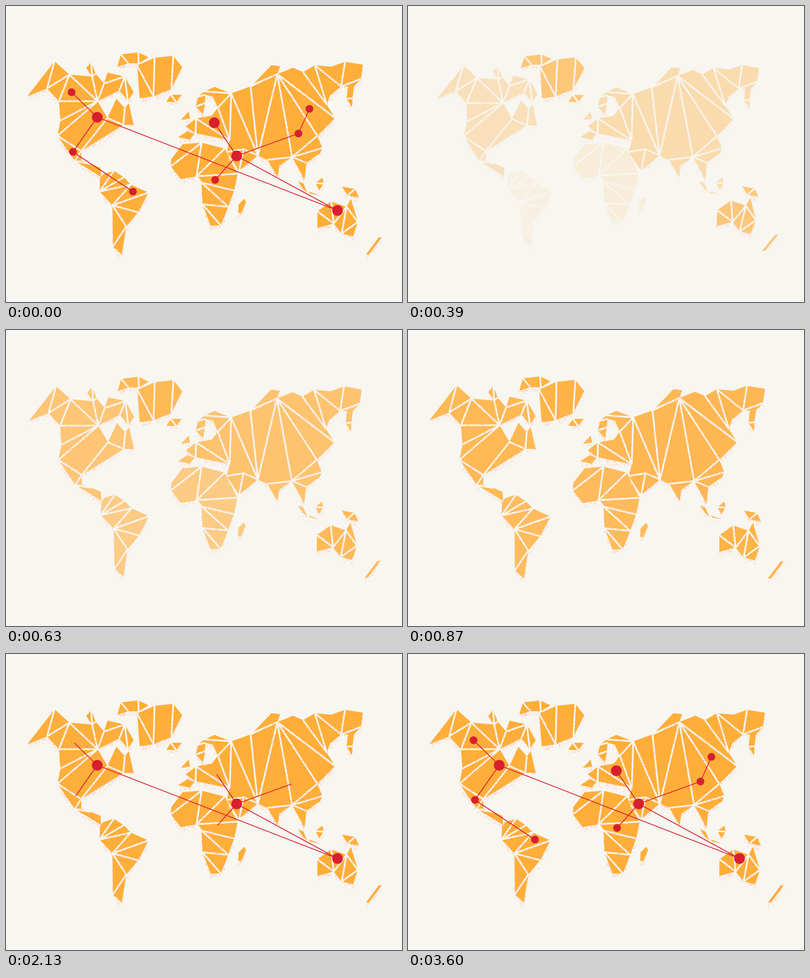
An HTML page with a canvas that plays this animation: 800x600 px, repeating every 3660 ms.

```html
<!DOCTYPE html>
<html lang="en">
<head>
<meta charset="utf-8">
<title>Connected world</title>
<style>
html, body { margin: 0; width: 100%; height: 100%; overflow: hidden; background: #f7f6f1; }
canvas { position: absolute; left: 0; top: 0; width: 800px; height: 600px; transform-origin: 50% 50%; }
</style>
</head>
<body>
<script>
const W = 800, H = 600, LOOP = 3660;
const LAND = '#ffae3a', RED = '#d71f2f';
const LETTERS = 'abcdefghijklmnopqrstuvwxyzABCDEFGHIJKLMNOPQRSTUVWXYZ';

let seed = 7;
const rand = () => (seed = seed * 16807 % 2147483647) / 2147483647;
const clamp = v => Math.max(0, Math.min(1, v));
const outCubic = u => 1 - (1 - u) ** 3;
const inOutQuad = u => u < .5 ? 2 * u * u : 1 - 2 * (1 - u) ** 2;

function addLayer() {
  const canvas = document.createElement('canvas');
  canvas.width = W;
  canvas.height = H;
  document.body.append(canvas);
  return canvas;
}

// Corners are lettered in order; each seam names the two corners it joins.
// Inner corners serve seams only.
function island(outline, seams = '', inner = '') {
  const parse = s => s ? s.split(',').map(p => p.split(' ')) : [];
  const edge = parse(outline), all = edge.concat(parse(inner));
  const at = c => all[LETTERS.indexOf(c)].join(' ');
  return {
    shape: new Path2D('M' + edge.join('L') + 'Z'),
    cuts: new Path2D(seams.split(' ').filter(Boolean).map(([a, b]) => `M${at(a)}L${at(b)}`).join(''))
  };
}

// Speckled shadow below every edge: a pixel is lit if a random look upwards finds land
function speckle(g) {
  const { data } = g.getImageData(0, 0, W, H);
  const solid = (x, y) => data[(y * W + x) * 4 + 3] > 128;
  g.globalCompositeOperation = 'destination-over';
  for (let y = 14; y < H - 14; y++) {
    for (let x = 14; x < W - 14; x++) {
      if (solid(x, y)) continue;
      const dx = Math.round(rand() * 4 - 2), dy = Math.round(rand() * 12);
      if (!solid(x + dx, y - dy)) continue;
      g.fillStyle = rand() < .36 ? '#f5c3ae' : '#fffdfb';
      g.fillRect(x, y, 1, 1);
    }
  }
}

// A sheet of islands that fades in after `delay` while it swings up from a hinge;
// `tilt` is how fast it recedes along x and y.
function region(delay, hinge, tilt, ...islands) {
  const canvas = addLayer(), g = canvas.getContext('2d');
  g.fillStyle = LAND;
  g.lineWidth = 3.5;
  for (const { shape } of islands) g.fill(shape);
  g.globalCompositeOperation = 'destination-out';
  for (const { cuts } of islands) g.stroke(cuts);
  speckle(g);
  return t => {
    const k = clamp((985 - t) / 955) ** 3 * 4.1;
    const [a, b] = tilt.map(v => v * k * 1e-5);
    const w = 1 + a * (W / 2 - hinge[0]) + b * (H / 2 - hinge[1]);
    canvas.style.transform = k ? `matrix3d(1,0,0,${a}, 0,1,0,${b}, 0,0,1,0, 0,0,0,${w})` : 'none';
    canvas.style.opacity = 1 - Math.exp(-Math.max(0, t - delay) / 300);
  };
}

const regions = [
  // North America
  region(285, [310, 370], [-8, -13],
    island('43 183,98 112,128 139,174 143,162 126,172 113,181 137,198 157,205 135,240 143,258 175,246 192,229 171,185 193,205 227,223 188,240 207,248 197,258 241,237 241,152 294,152 313,139 314,104 263,110 232,107 193,83 167',
      'bA Ac cz zn cn dn hn hj jm jl fd dg yn nx xu uo ot qt uw'),
    island('140 315,153 314,172 320,191 328,192 346,152 322', 'ac')),
  // South America
  region(362, [288, 200], [-12, 28],
    island('196 341,218 334,238 347,252 362,288 378,267 418,243 447,234 504,216 487,215 404,189 376,190 350',
      'kb kc kd dj je jf jg gi')),
  // Africa
  region(348, [333, 300], [18, 17],
    island('333 325,334 310,357 280,395 277,442 289,468 340,461 374,449 407,434 445,413 445,397 402,395 358,385 345,353 351',
      'ad dm me mf ml lg lh kh ki'),
    island('470 402,481 391,485 397,476 419,469 420')),
  // Europe and Asia
  region(250, [363, 244], [8.7, -7.5],
    island('383 204,388 184,401 173,421 164,455 177,494 163,548 138,580 125,600 134,624 120,657 123,685 113,721 119,717 148,703 163,700 187,699 206,688 188,691 163,677 163,655 181,648 200,665 227,629 263,639 288,635 298,607 318,603 352,578 306,552 324,549 347,528 312,509 303,471 334,446 296,452 272,383 258,363 244,384 228,416 222,428 206,418 184,403 180,402 197,398 219',
      'ce eO eJ eG fG gG gC gx gw iv jv jt lt tn rp xC FC Cy CA MK MJ OJ fg IT TH TG aR bQ', '480 290'),
    island('498 160,536 120,554 122,548 138', 'ad'),
    island('348 266,366 254,381 259,371 271'),
    island('353 231,369 214,372 228'),
    island('590 355,601 360,609 379,599 369'),
    island('612 376,634 384,614 380'),
    island('625 359,639 348,642 360,633 373', 'ac')),
  // Oceania
  region(70, [640, 300], [4, 17],
    island('629 416,657 396,688 407,697 391,711 438,701 467,678 461,662 441,629 450', 'ah bh ch cg ce eg'),
    island('679 366,705 371,713 388,690 384', 'bd'),
    island('727 504,753 469,759 469,734 503')),
  // Greenland
  region(70, [330, 195], [-4, -18],
    island('265 121,300 105,338 101,356 124,334 168,298 183,270 187', 'af bf ce'),
    island('225 123,232 98,267 94,288 104,268 116,247 116', 'bf ce'),
    island('324 194,333 180,355 180,344 195', 'bd'))
];

// The network is a tree; each generation follows the last by one step
const BIG = 10.8, SMALL = 7.8, STEP = 555;
const nodes = [];
function node(x, y, r, parent) {
  const n = { x, y, r, parent, depth: parent ? parent.depth + 1 : 0 };
  nodes.push(n);
  return n;
}
const root = node(669.7, 414.5, BIG);
const west = node(184.3, 225.5, BIG, root);
const hub = node(466, 303.8, BIG, root);
const mexico = node(135.2, 295.8, SMALL, west);
const china = node(590.8, 258.5, SMALL, hub);
node(132.5, 174.8, SMALL, west);
node(420.8, 236.5, BIG, hub);
node(422.4, 352.6, SMALL, hub);
node(256.5, 376.2, SMALL, mexico);
node(613, 208.5, SMALL, china);

const ctx = addLayer().getContext('2d');
ctx.strokeStyle = ctx.fillStyle = RED;
ctx.lineWidth = 1.7;

function drawNetwork(t) {
  ctx.clearRect(0, 0, W, H);
  for (const { x, y, parent, depth } of nodes) {
    const p = inOutQuad(clamp((t - 715 - STEP * depth) / 400));
    if (!parent || !p) continue;
    ctx.beginPath();
    ctx.moveTo(parent.x, parent.y);
    ctx.lineTo(parent.x + (x - parent.x) * p, parent.y + (y - parent.y) * p);
    ctx.stroke();
  }
  for (const { x, y, r, depth } of nodes) {
    ctx.beginPath();
    ctx.arc(x, y, r * outCubic(clamp((t - 1027 - STEP * depth) / 250)), 0, Math.PI * 2);
    ctx.fill();
  }
}

const begin = performance.now();
function tick() {
  let t = (performance.now() - begin) % LOOP;
  if (t < 30) t = LOOP; // the loop opens on the finished map
  for (const draw of regions) draw(t);
  drawNetwork(t);
  requestAnimationFrame(tick);
}
tick();
</script>
</body>
</html>
```
